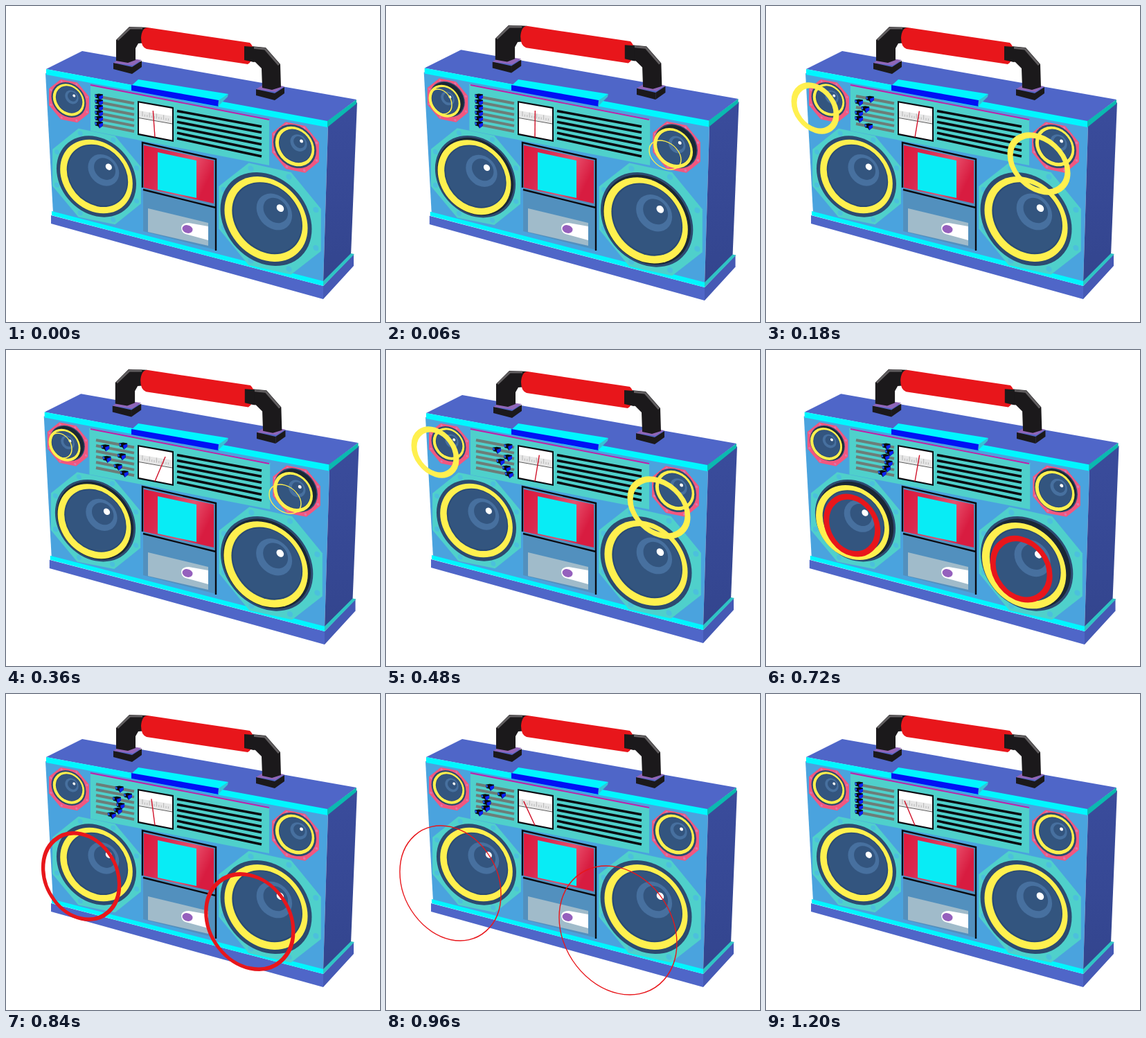
An HTML page for the animation above (1.26 s loop, 540 by 456 pixels).

```html
<!DOCTYPE html>
<html lang="en">
<head>
<meta charset="utf-8">
<title>Boombox</title>
<style>
  html, body { margin: 0; width: 100%; height: 100%; overflow: hidden; background: #fff; }
  svg { display: block; width: 540px; height: 456px; }
</style>
</head>
<body>
<svg id="stage" viewBox="0 0 540 456">
  <defs>
    <linearGradient id="foil" x2="1" y2=".4">
      <stop offset="0" stop-color="#e0173a"/><stop offset=".35" stop-color="#d92a50"/>
      <stop offset=".7" stop-color="#e8506c"/><stop offset="1" stop-color="#d81c40"/>
    </linearGradient>
    <linearGradient id="side" x2="0" y2="1">
      <stop offset="0" stop-color="#3a4c9c"/><stop offset="1" stop-color="#33458e"/>
    </linearGradient>
  </defs>
</svg>
<script>
const STEP = 60, COUNT = 21, ROWS = 6;
const BLUE = '#4f66c8', CYAN = '#00f6ff', TEAL = '#4fd0cb', PINK = '#f2577f', YELLOW = '#fff04f',
      RED = '#e8161b', BLACK = '#1b191b', GREY = '#625f61', CONE = '#33557f', INK = '#0a0a10';
const stage = document.getElementById('stage');

function add(tag, attrs, parent) {
  const el = document.createElementNS('http://www.w3.org/2000/svg', tag);
  for (const k in attrs) el.setAttribute(k, attrs[k]);
  return parent.appendChild(el);
}
const body = add('g', {}, stage);   // jumps with the beat
const panel = add('g', {}, stage);  // stays in place
const poly = (points, fill, parent) => add('polygon', { points, fill }, parent);
const path = (d, attrs, parent) => add('path', { d, ...attrs }, parent);
const line = (x1, y1, x2, y2, stroke, width, parent) =>
  add('line', { x1, y1, x2, y2, stroke, 'stroke-width': width }, parent);
// Four-sided face with upright sides: top edge plus the height at each end.
const slab = (x1, y1, x2, y2, h1, h2, fill, parent) =>
  poly([x1, y1, x2, y2, x2, y2 + h2, x1, y1 + h1], fill, parent);
const disc = (x, y, rx, ry, skew, fill, parent) =>
  add('ellipse', { rx, ry, fill, transform: `matrix(1 ${skew} 0 1 ${x} ${y})` }, parent);

function drawCase() {
  poly('58,91 110,65 506,135 464,167', BLUE, body);
  poly('57,97 465,172 458,399 68,299', '#4aa3de', body);
  poly('465,172 507,139 498,360 458,399', 'url(#side)', body);
  slab(58, 91, 464, 166, 8, 9, CYAN, body);
  slab(464, 166, 506, 135, 9, 6, '#0bb9b0', body);
  slab(65, 302, 458, 404, 12, 19, BLUE, body);
  slab(458, 404, 502, 358, 19, 17, '#4559b4', body);
  slab(66, 296, 458, 397, 6, 7, CYAN, body);
  poly('458,397 498,357 503,358 458,404', '#2fc4c4', body);
  slab(122, 114, 380, 164, 66, 66, TEAL, body);
}

function drawFoot(x, y) {
  slab(x, y, x + 27, y + 6, 9, 10, BLACK, body);
  slab(x + 27, y + 6, x + 41, y - 3, 10, 9, BLACK, body);
  poly([x, y, x + 13, y - 8, x + 41, y - 4, x + 28, y + 4], '#9066b8', body);
}

function drawHandle() {
  drawFoot(155, 82);
  drawFoot(361, 120);
  poly('159,79 159,49 178,30 204,31 204,53 191,54 187,61 187,78 176,82', BLACK, body);
  poly('344,57 375,60 396,84 397,117 384,121 370,118 369,90 360,81 344,78', BLACK, body);
  path('M161 49L179 32H197M345 59L374 62L394 85', { fill: 'none', stroke: GREY, 'stroke-width': 3 }, body);
  path('M204 31L352 53Q358 58 357 68Q356 80 349 84L203 62Q195 59 195 46Q196 32 204 31Z', { fill: RED }, body);
  poly('344,58 358,59 358,81 344,78', BLACK, body);
}

function drawControls() {
  poly('191,106 321,127 307,137 181,115', CYAN, panel);
  slab(181, 114, 307, 136, 8, 9, '#0011f5', panel);
  poly('321,127 320,131 306,145 307,136', '#35c3d6', panel);
  line(122, 114, 380, 164, '#c01fa8', 1.8, panel);
  for (let i = 0; i < ROWS; i++) {
    line(130, 130 + 8 * i, 185, 140.5 + 8.1 * i, '#6d7d78', 4, panel);
    line(247, 151.5 + 7.9 * i, 369, 174 + 8.6 * i, INK, 3.6, panel);
  }
  slab(190, 137, 242, 146, 49, 50, INK, panel);
  slab(192, 139.5, 240, 148, 44.5, 45.5, '#fff', panel);
  slab(192, 151, 240, 159, 10, 10, '#e6e6e6', panel);
  line(192, 161.5, 240, 170, '#555', 1, panel);
  for (let i = 0; i < 12; i++) {
    const x = 197 + i * 3.4, y = 159 + i * .58;
    line(x, y, x, y - (i % 3 ? 3 : 7), '#aaa', .8, panel);
  }
}

function drawDeck() {
  slab(198, 198, 303, 221, 127, 131, '#5290be', panel);
  slab(199, 201, 300, 223, 61, 62, 'url(#foil)', panel);
  slab(219, 211, 275, 223, 54, 54, '#08ecf5', panel);
  path('M197 262V197L303 221V353M198 265L303 291', { fill: 'none', stroke: INK, 'stroke-width': 2.4 }, panel);
  slab(205, 292, 292, 313, 34, 33, '#a0bbca', panel);
  path('M292 318L264 313Q253 313 253 321Q254 329 263 330L292 338Z', { fill: '#fff' }, panel);
  disc(262, 322, 7.5, 5.8, .12, '#9560bd', panel);
}

// Eight-sided plate with a bolt just inside each corner.
function drawPlate(x, y, half, skew, fill, bolt) {
  const corners = Array.from({ length: 8 }, (_, i) => {
    const a = (i + .5) * Math.PI / 4, u = half * 1.08 * Math.cos(a), v = half * 1.08 * Math.sin(a);
    return [u, v + u * skew];
  });
  poly(corners.map(([u, v]) => [x + u, y + v]).join(' '), fill, body);
  for (const [u, v] of corners) disc(x + u * .9, y + v * .9, half * .055, half * .055, skew, bolt, body);
}

// Cone parts are sized and placed as fractions of the speaker radius.
function speaker(x, y, r, skew) {
  disc(x, y, r, r, skew, '#2c4a70', body);
  const shade = disc(x, y, r * .95, r * .95, skew, '#1a2735', body);
  const cone = add('g', {}, body);
  const part = (dx, dy, size, fill) =>
    disc(x + dx * r, y + dy * r, size * r, size * r, skew, fill, cone);
  part(0, 0, .91, YELLOW);
  part(.025, -.02, .77, '#2a4a73');
  part(.03, -.025, .74, CONE);
  part(.18, -.16, .39, '#47709f');
  part(.21, -.19, .27, CONE);
  part(.31, -.24, .08, '#fff');
  return { cone, shade };
}

drawCase();
drawHandle();
drawControls();
drawDeck();
drawPlate(131, 246, 64, .2, TEAL, '#4cc0dc');
drawPlate(381, 307, 74, .22, TEAL, '#4cc0dc');
drawPlate(91, 137, 29, .2, PINK, '#d877ae');
drawPlate(418, 204, 34, .2, PINK, '#d877ae');
const woofers = [speaker(130.5, 246, 57.5, .2), speaker(375.5, 307.5, 66, .22)];
const tweeters = [speaker(90.5, 135.5, 25, .2), speaker(417, 202.5, 31, .2)];

const needle = line(215, 189.5, 215, 151, '#d01028', 1.4, panel);
const needleKeys = [[0, -4], [6, 23], [10, -4], [12, 10], [16, -25], [20, -23]];

// Each knob slides right and back within its own span of steps.
const knobs = [[1, 18], [5, 20], [2, 17], [5, 17], [3, 17], [1.5, 16]].map(([from, to]) => {
  const g = add('g', {}, panel);
  poly('-6,-4 0,-5 6,-4 6,1 1,5 -1,2 -5,1', INK, g);
  poly('0,-1 6,-3 6,1 1,5', '#0a22f5', g);
  poly('-6,-4 -3,-3 -3,0 -5,0', '#1b5cf0', g);
  return { g, from, to };
});

// Rings grow from one ellipse [x, y, half width, half height] to another.
const ring = (stroke, from, to) => ({ el: add('ellipse', { fill: 'none', stroke }, stage), from, to });
const yellowRings = [
  ring(YELLOW, [79, 138, 16, 18], [63, 157, 45, 48]),
  ring(YELLOW, [403, 215, 23, 21], [385, 240, 60, 61])
];
const redRings = [
  ring(RED, [132, 248, 28, 31], [93, 273, 73, 83]),
  ring(RED, [377, 310, 30, 32], [335, 341, 85, 93])
];
const high = { cones: tweeters, rings: yellowRings, length: 4, power: 1, swell: 1, skew: .3 };
const low = { cones: woofers, rings: redRings, length: 5, power: 2, swell: .45, skew: .22 };
const beats = [{ start: 1, voice: high }, { start: 6, voice: high }, { start: 11, voice: low }];

const mix = (a, b, p) => a + (b - a) * p;
const clamp = (v, lo, hi) => Math.min(hi, Math.max(lo, v));

function needleAngle(k) {
  const i = Math.max(1, needleKeys.findIndex(([t]) => t >= k));
  const [t0, a0] = needleKeys[i - 1], [t1, a1] = needleKeys[i];
  return mix(a0, a1, (k - t0) / (t1 - t0));
}

function drawRings(voice, p) {
  const visible = p >= 0 && p <= 1;
  for (const { el, from, to } of voice.rings) {
    el.style.display = visible ? '' : 'none';
    if (!visible) continue;
    const [x, y, w, h] = from.map((v, i) => mix(v, to[i], p));
    el.setAttribute('rx', w);
    el.setAttribute('ry', Math.sqrt(h * h - (voice.skew * w) ** 2));
    el.setAttribute('transform', `matrix(1 ${voice.skew} 0 1 ${x} ${y})`);
    el.setAttribute('stroke-width', 1.4 + 6.6 * Math.sin(Math.PI * p ** voice.swell));
  }
}

function pop(cones, amount) {
  for (const { cone, shade } of cones) {
    cone.setAttribute('transform', `translate(${-amount} ${amount * .7})`);
    shade.style.display = amount ? '' : 'none';
  }
}

function draw(k) {
  const beat = beats.findLast(b => b.start <= k);
  const age = beat ? k - beat.start : 0;
  const punch = beat ? Math.max(0, beat.voice.power - age) : 0;
  body.setAttribute('transform', `translate(270 229) scale(${1 + punch * .0108}) translate(-270 -229)`);
  body.style.filter = punch ? 'blur(.7px)' : 'none';
  for (const voice of [high, low]) {
    const active = beat && beat.voice === voice;
    pop(voice.cones, punch && (active ? 4 : 1.5));
    drawRings(voice, active ? age / voice.length : -1);
  }
  needle.setAttribute('transform', `rotate(${needleAngle(k)} 215 189.5)`);
  knobs.forEach(({ g, from, to }, row) => {
    const dx = 44 * Math.sin(Math.PI * clamp((k - from) / (to - from), 0, 1));
    g.setAttribute('transform', `translate(${134 + dx} ${131.5 + 8 * row + dx * .2})`);
  });
}

const start = performance.now();
let shown = -1;
function tick(now) {
  const k = Math.floor(Math.max(0, now - start) / STEP) % COUNT;
  if (k !== shown) draw(shown = k);
  requestAnimationFrame(tick);
}
draw(0);
requestAnimationFrame(tick);
</script>
</body>
</html>
```
